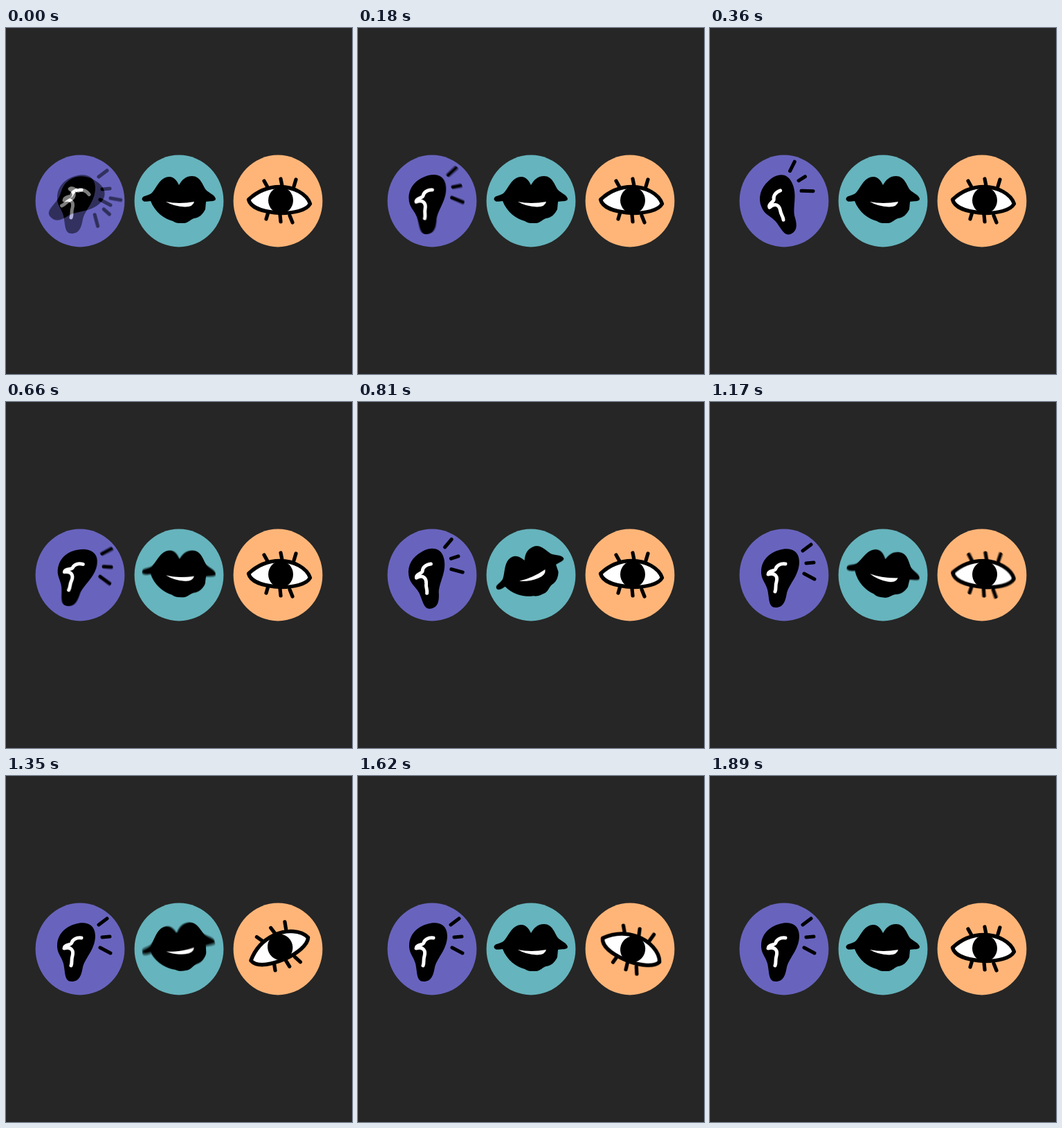
Recreate the animation shown at these times as an HTML page with a canvas. Size 500 px wide and 500 px high, loop 1920 ms.

```html
<!DOCTYPE html>
<html lang="en">
<head>
<meta charset="utf-8">
<title>Ear, lips, eye</title>
<style>
html, body { margin: 0; width: 100%; height: 100%; overflow: hidden; background: #262626; }
canvas { display: block; }
</style>
</head>
<body>
<canvas id="stage" width="500" height="500"></canvas>
<script>
const LOOP = 1920, STEP = 30, SHUTTER = 20, SAMPLES = 12;
const ctx = document.getElementById('stage').getContext('2d');
const layer = document.createElement('canvas');
layer.width = layer.height = 140;
const pen = layer.getContext('2d');
pen.lineCap = pen.lineJoin = 'round';

function fill(d, color) {
  pen.fillStyle = color;
  pen.fill(new Path2D(d));
}

function stroke(d, color, width) {
  pen.strokeStyle = color;
  pen.lineWidth = width;
  pen.stroke(new Path2D(d));
}

function ear() {
  fill('M100 214C112 210 129 212 129 231C129 250 115 262 111 276C109 288 106 297 95 297C84 297 86 284 83 271C80 260 73 256 74 243C75 229 85 218 100 214Z', '#000');
  stroke('M109 234C101 233 96 237 95 241C94 245 84 243 84 249C95 246 98 253 96 260C94 266 96 269 94 274', '#fff', 5);
  stroke('M134 215L146 206M139 233L150 232M136 248L151 256', '#000', 5);
}

function lips() {
  fill('M196.5 247C197 242 204 243 210 239C217 233 222 215 236 215C243 215 247 221 250 227C254 220 259 214 269 214C281 214 284 227 289 234C294 239 302 241 303 247C303 251 294 250 289 251L288 262C284 270 279 274 272 275C266 277 264 281 258 282C252 282 246 283 241 279C229 276 215 266 209 250C204 251 197 252 196.5 247Z', '#000');
  fill('M231 251Q250 255 272 251Q270 259 258 258.5Q243 258 231 251Z', '#fff');
}

function eye() {
  const lid = 'M350.5 248C362 237 378 229.5 396 229.5C416 229.5 435 240 439.5 254C434 264 415 267.5 398 267.5C378 266.5 354 262 350.5 248Z';
  fill(lid, '#fff');
  stroke(lid, '#000', 5.4);
  fill('M379 249a18 19 0 1 0 36 0a18 19 0 1 0 -36 0Z', '#000');
  stroke('M373 221L378 230M397 218L399 228M419 219L416 229M379 266L376 276M396 270L397 280M410 271L414 281', '#000', 5.2);
}

const badges = [
  { x: 107, color: '#6864be', draw: ear, start: 0 },
  { x: 250, color: '#66b4bd', draw: lips, start: 510 },
  { x: 393, color: '#ffb578', draw: eye, start: 1020 }
];

// Swing turning points: [ms, degrees]
const swing = [[0, 48], [365, -26.5], [530, 24], [820, -13], [868, 0]];

function angle(t) {
  if (t < 0) return 0;
  const i = swing.findIndex(p => p[0] > t);
  if (i < 0) return 0;
  const [t0, a0] = swing[i - 1], [t1, a1] = swing[i];
  let u = (t - t0) / (t1 - t0);
  if (i === 1) u **= 0.62; // the first fall starts fast and settles late
  return a0 + (a1 - a0) * (1 - Math.cos(Math.PI * u)) / 2;
}

function paintBadge(b, degrees) {
  pen.setTransform(1, 0, 0, 1, 70, 70);
  pen.fillStyle = '#262626';
  pen.fillRect(-70, -70, 140, 140);
  pen.fillStyle = b.color;
  pen.beginPath();
  pen.ellipse(0, 0, 64.4, 66.4, 0, 0, 2 * Math.PI);
  pen.fill();
  pen.rotate(degrees * Math.PI / 180);
  pen.translate(-b.x, -250);
  b.draw();
}

function render(t) {
  ctx.globalAlpha = 1;
  ctx.fillStyle = '#262626';
  ctx.fillRect(0, 0, 500, 500);
  for (const b of badges) {
    // Motion blur: running average of poses across the shutter time
    for (let k = 0; k < SAMPLES; k++) {
      const offset = ((k + 0.5) / SAMPLES - 0.5) * SHUTTER;
      paintBadge(b, angle(t - b.start + offset));
      ctx.globalAlpha = 1 / (k + 1);
      ctx.drawImage(layer, b.x - 70, 180);
    }
  }
}

const begin = performance.now();
function tick() {
  const t = (performance.now() - begin) % LOOP;
  render(Math.floor(t / STEP) * STEP);
  requestAnimationFrame(tick);
}
tick();
</script>
</body>
</html>
```
